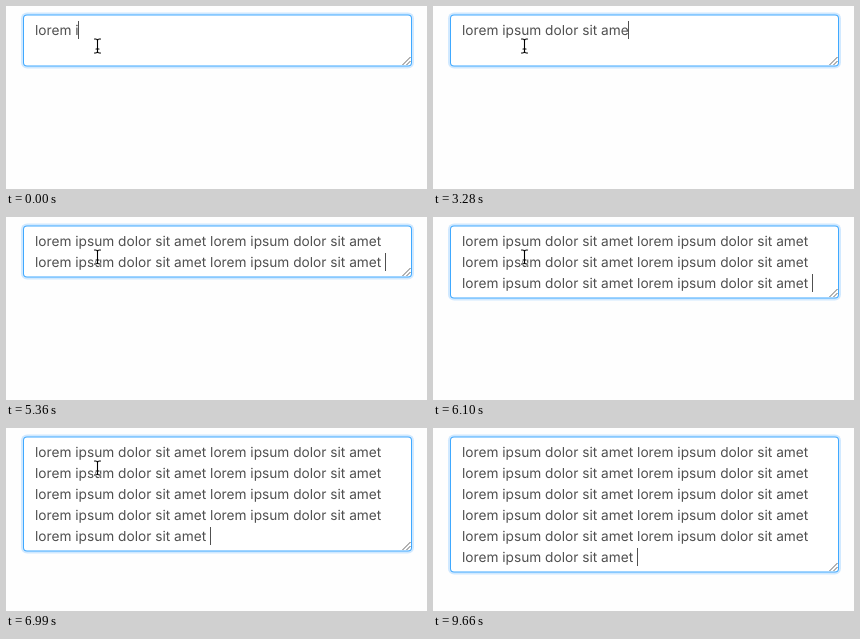
An HTML page with a canvas for the animation above (9.76 s loop, 421 by 183 pixels).

```html
<!DOCTYPE html>
<html lang="en">
<head>
<meta charset="utf-8">
<title>Growing text area</title>
<style>
  html, body { margin: 0; width: 100%; height: 100%; overflow: hidden; background: #fefefe; }
  canvas { display: block; }
</style>
</head>
<body>
<canvas id="stage" width="421" height="183"></canvas>
<script>
const ctx = document.getElementById('stage').getContext('2d');
const LOOP = 9760;
const TICK = 148.18;
const PHRASE = 'lorem ipsum dolor sit amet ';
const PER_LINE = PHRASE.length * 2;
const LINE_HEIGHT = 21;
const BOX = { x: 17, y: 8.5, w: 389 };
const TEXT = { x: 29, y: 15 };

// All moments below are counted in ticks.
const TYPING_START = 2, CHARS_PER_TICK = 0.871, CHARS_AT_START = 7.1;
const PASTE_START = 31, PASTES_PER_TICK = 7 / 16, PASTE_COUNT = 10;
const BLINK = 3.35;
const MOVE_START = 58, MOVE_END = 62;
const REST = { x: 91, y: 39.5 }, EXIT = { x: 311, y: 151 };

const clamp = (value, low, high) => Math.min(high, Math.max(low, value));

function charCount(tick) {
  const typed = Math.round(CHARS_AT_START + (tick - TYPING_START) * CHARS_PER_TICK);
  const pasted = Math.floor((tick - PASTE_START) * PASTES_PER_TICK) + 1;
  return clamp(typed, 7, PHRASE.length) + clamp(pasted, 0, PASTE_COUNT) * PHRASE.length;
}

// The caret starts blinking once the text has stopped changing.
function caretVisible(tick) {
  let idle = 0;
  while (idle < tick && charCount(tick - idle - 1) === charCount(tick)) idle++;
  return Math.floor((idle + 0.5) / BLINK) % 2 === 0;
}

function roundRect(x, y, w, h, r, color) {
  ctx.beginPath();
  ctx.roundRect(x, y, w, h, r);
  ctx.fillStyle = color;
  ctx.fill();
}

function line(x1, y1, x2, y2) {
  ctx.beginPath();
  ctx.moveTo(x1, y1);
  ctx.lineTo(x2, y2);
  ctx.stroke();
}

function drawBox(rows) {
  const { x, y, w } = BOX;
  const h = rows * LINE_HEIGHT + 10;
  roundRect(x - 2, y - 2, w + 4, h + 4, 6, '#d1e9ff');
  roundRect(x, y, w, h, 4, '#40a9ff');
  roundRect(x + 1, y + 1, w - 2, h - 2, 3, '#fff');

  const right = x + w - 1.5, bottom = y + h - 1.5;
  ctx.strokeStyle = '#666';
  ctx.lineWidth = 1;
  for (const size of [8, 4]) line(right - size, bottom, right, bottom - size);
}

function drawText(count, caretOn) {
  ctx.font = '13.7px Inter, sans-serif';
  ctx.textRendering = 'geometricPrecision';
  ctx.fillStyle = '#505050';
  const text = PHRASE.repeat(PASTE_COUNT + 1).slice(0, count);
  const last = Math.ceil(count / PER_LINE) - 1;
  for (let row = 0; row <= last; row++) {
    const part = text.slice(row * PER_LINE, (row + 1) * PER_LINE);
    const top = TEXT.y + row * LINE_HEIGHT;
    ctx.fillText(part, TEXT.x, top + 14);
    if (row === last && caretOn) {
      ctx.fillRect(Math.floor(TEXT.x + ctx.measureText(part).width), top, 1, 18);
    }
  }
}

function outlined(path, width) {
  ctx.lineJoin = ctx.lineCap = 'round';
  ctx.strokeStyle = '#fff';
  ctx.lineWidth = width + 1.4;
  ctx.stroke(path);
  ctx.strokeStyle = '#000';
  ctx.lineWidth = width;
  ctx.stroke(path);
}

const BEAM = new Path2D(
  'M-2.5 -6.5H-1.5Q.5 -6.5 .5 -5Q.5 -6.5 2.5 -6.5H3.5' +
  'M.5 -5V6M-2.5 7.5H-1.5Q.5 7.5 .5 6Q.5 7.5 2.5 7.5H3.5M-1 3.5H2');
const ARROW = new Path2D('M0 0V14L3.3 11L5.7 16.5L8 15.5L5.7 10.2H10.2Z');

function drawPointer(tick) {
  if (tick > MOVE_END) return;
  const p = clamp((tick - MOVE_START) / (MOVE_END - MOVE_START), 0, 1);
  const eased = p * p * (3 - 2 * p);
  const x = REST.x + (EXIT.x - REST.x) * eased;
  const y = REST.y + (EXIT.y - REST.y) * eased;
  ctx.save();
  ctx.translate(x, y);
  if (p < 1) {
    outlined(BEAM, 1.1);
  } else {
    outlined(ARROW, 0.6);
    ctx.fillStyle = '#000';
    ctx.fill(ARROW);
  }
  ctx.restore();
}

function draw(time) {
  const tick = Math.floor(time / TICK);
  const count = charCount(tick);
  ctx.fillStyle = '#fefefe';
  ctx.fillRect(0, 0, 421, 183);
  drawBox(Math.max(2, Math.ceil(count / PER_LINE)));
  drawText(count, caretVisible(tick));
  drawPointer(tick);
}

const start = performance.now();
function animate() {
  draw((performance.now() - start) % LOOP);
  requestAnimationFrame(animate);
}
animate();
</script>
</body>
</html>
```
